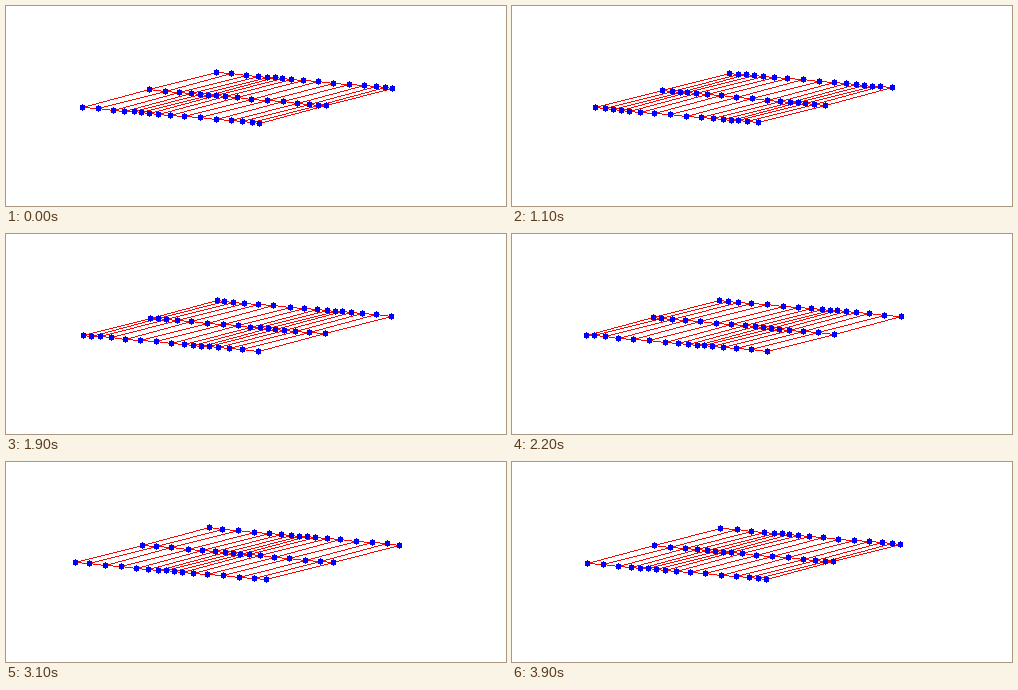
Write a matplotlib script that moves like this. It is 500 px wide and 200 px high and loops after 4000 ms.

```python
import numpy as np
import matplotlib.pyplot as plt
from matplotlib.animation import FuncAnimation
from matplotlib.collections import PolyCollection

# Longitudinal wave travelling left through a slanted lattice of points,
# drawn without smoothing: every shape is built from whole pixels.
W, H, DPI = 500, 200, 100
FRAMES, INTERVAL = 40, 100
COLS, ROWS = 16, 3
WAVELENGTH = 10          # in columns
AMPLITUDE = 7            # in pixels along a row

ORIGIN = np.array([76.37, 100.85])
COL_STEP = np.array([11.79, 1.06])
ROW_STEP = np.array([66.61, -17.4])
DIRECTION = COL_STEP / COL_STEP[0]

fig = plt.figure(figsize=(W / DPI, H / DPI), dpi=DPI, facecolor="white")
ax = fig.add_axes([0, 0, 1, 1])
ax.set_xlim(0, W)
ax.set_ylim(H, 0)
ax.axis("off")


def pixel_layer(color, zorder):
    layer = PolyCollection([], facecolors=color, linewidths=0,
                           antialiaseds=False, snap=False, zorder=zorder)
    ax.add_collection(layer, autolim=False)
    return layer


lines = pixel_layer("#ff0000", 1)
dots = pixel_layer("#0000ff", 2)


def lattice(frame):
    """Whole-pixel point positions, shaped (row, column, xy)."""
    col = np.arange(COLS)
    phase = 2 * np.pi * (col / WAVELENGTH + frame / FRAMES)
    shift = AMPLITUDE * np.sin(phase)
    row = ORIGIN + np.outer(col, COL_STEP) + np.outer(shift, DIRECTION)
    points = row + np.arange(ROWS)[:, None, None] * ROW_STEP
    return np.floor(points + 0.5)


def box(x0, y0, x1, y1):
    """Block of pixels, ends included, inset so no neighbour is touched."""
    left, top, right, bottom = x0 + 0.1, y0 + 0.1, x1 + 0.9, y1 + 0.9
    return [(left, top), (right, top), (right, bottom), (left, bottom)]


def stroke(start, end):
    """One-pixel line from left to right, as horizontal runs."""
    xs = np.arange(start[0], end[0] + 1)
    ys = np.floor(np.linspace(start[1], end[1], len(xs)) + 0.5)
    runs = []
    for y in np.unique(ys):
        run = xs[ys == y]
        runs.append(box(run[0], y, run[-1], y))
    return runs


def dot(x, y):
    return [box(x - 2, y - 2, x + 2, y + 2), box(x, y - 3, x, y + 3)]


def update(frame):
    points = lattice(frame)
    paths = list(points) + list(points.swapaxes(0, 1))
    lines.set_verts([run for path in paths
                     for start, end in zip(path, path[1:])
                     for run in stroke(start, end)])
    dots.set_verts([part for x, y in points.reshape(-1, 2)
                    for part in dot(x, y)])
    return lines, dots


anim = FuncAnimation(fig, update, frames=FRAMES, interval=INTERVAL,
                     repeat=True, repeat_delay=0, blit=False)
plt.show()
```
